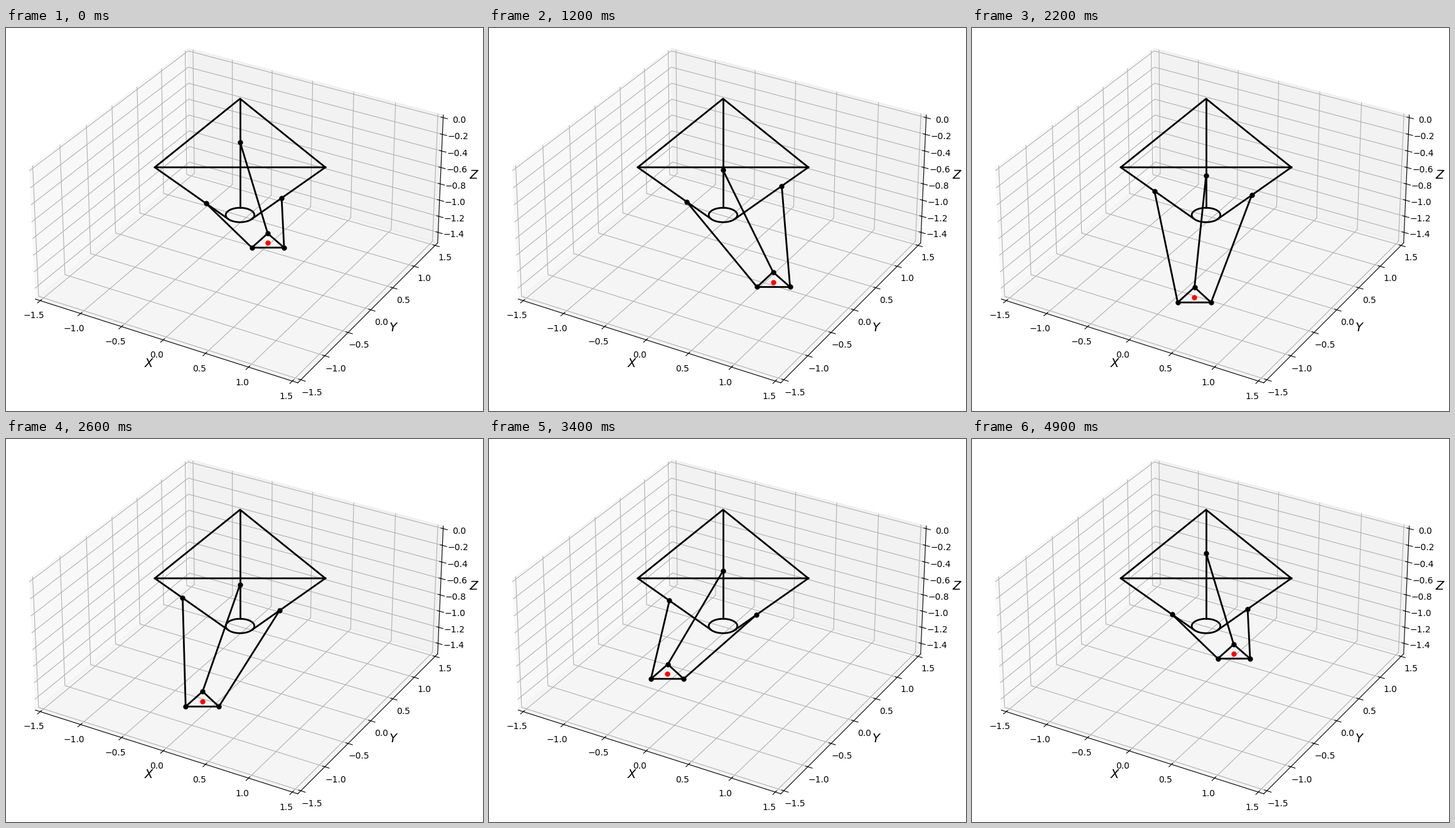
Recreate the animation shown at these times as a matplotlib script. Size 760 by 610 pixels, loop 5000 ms.

```python
import numpy as np
import matplotlib.pyplot as plt
from matplotlib.animation import FuncAnimation

FRAMES = 50
INTERVAL = 100
WIDTH, HEIGHT, DPI = 760, 610, 100

BASE_R = 1.0        # base triangle circumradius, at z = 0
RING_R = 0.15       # the 45 degree rails end on this ring
PLATFORM_R = 0.2
LEG = 1.2
PATH_R = 0.6
PATH_Z = -1.5

ANGLES = np.radians([0, 120, 240])
DIRS = np.column_stack([np.cos(ANGLES), np.sin(ANGLES), np.zeros(3)])
DOWN = np.array([0, 0, -1.0])


def closed(points):
    return np.vstack([points, points[:1]])


def rail_points(q):
    """Points on the three rails after descending by q."""
    q = np.broadcast_to(q, 3)[:, None]
    return (BASE_R - q) * DIRS + q * DOWN


def slider_positions(center):
    """Inverse kinematics: descent of each slider for a platform center."""
    along = DIRS @ center
    across2 = center[0] ** 2 + center[1] ** 2 - along ** 2
    a = BASE_R - PLATFORM_R - along
    b = -center[2]
    return (a + b - np.sqrt(2 * (LEG ** 2 - across2) - (a - b) ** 2)) / 2


fig = plt.figure(figsize=(WIDTH / DPI, HEIGHT / DPI), dpi=DPI, facecolor="white")
# The square axes reach past the stage on every side but the right one.
left, bottom, side = -22.5, -70, 770
ax = fig.add_axes([left / WIDTH, bottom / HEIGHT, side / WIDTH, side / HEIGHT],
                  projection="3d")
ax.view_init(elev=30, azim=-60)
ax.set_box_aspect((2, 2, 1), zoom=0.9)
ax.set_xticks(np.linspace(-1.5, 1.5, 7))
ax.set_yticks(np.linspace(-1.5, 1.5, 7))
ax.set_zticks(np.linspace(-1.4, 0, 8))
ax.set_xlim(-1.5625, 1.5625)
ax.set_ylim(-1.5625, 1.5625)
ax.set_zlim(-1.53125, 0.03125)
ax.set_xlabel("$X$", fontsize=14)
ax.set_ylabel("$Y$", fontsize=14)
ax.set_zlabel("$Z$", fontsize=14)


def draw_line(points):
    return ax.plot(*np.asarray(points).T, color="black", lw=2)[0]


def draw_dots(points, color):
    return ax.plot(*np.asarray(points).T, "o", color=color, ms=5)[0]


tops, ends = rail_points(0), rail_points(BASE_R - RING_R)
draw_line(closed(tops))
for rail in zip(tops, ends):
    draw_line(rail)
turn = np.linspace(0, 2 * np.pi, 60)
draw_line(np.column_stack([RING_R * np.cos(turn), RING_R * np.sin(turn),
                           np.full_like(turn, RING_R - BASE_R)]))

legs = [draw_line(np.zeros((2, 3))) for _ in range(3)]
platform = draw_line(np.zeros((4, 3)))
joints = draw_dots(np.zeros((6, 3)), "black")
tool = draw_dots(np.zeros((1, 3)), "red")


def update(frame):
    t = 2 * np.pi * frame / (FRAMES - 1)
    center = np.array([PATH_R * np.sin(t), PATH_R * np.cos(t), PATH_Z])
    sliders = rail_points(slider_positions(center))
    corners = center + PLATFORM_R * DIRS
    for leg, slider, corner in zip(legs, sliders, corners):
        leg.set_data_3d(*np.array([slider, corner]).T)
    platform.set_data_3d(*closed(corners).T)
    joints.set_data_3d(*np.vstack([sliders, corners]).T)
    tool.set_data_3d(*center[:, None])
    return [*legs, platform, joints, tool]


anim = FuncAnimation(fig, update, frames=FRAMES, interval=INTERVAL,
                     repeat=True, repeat_delay=0, blit=False)
plt.show()
```
